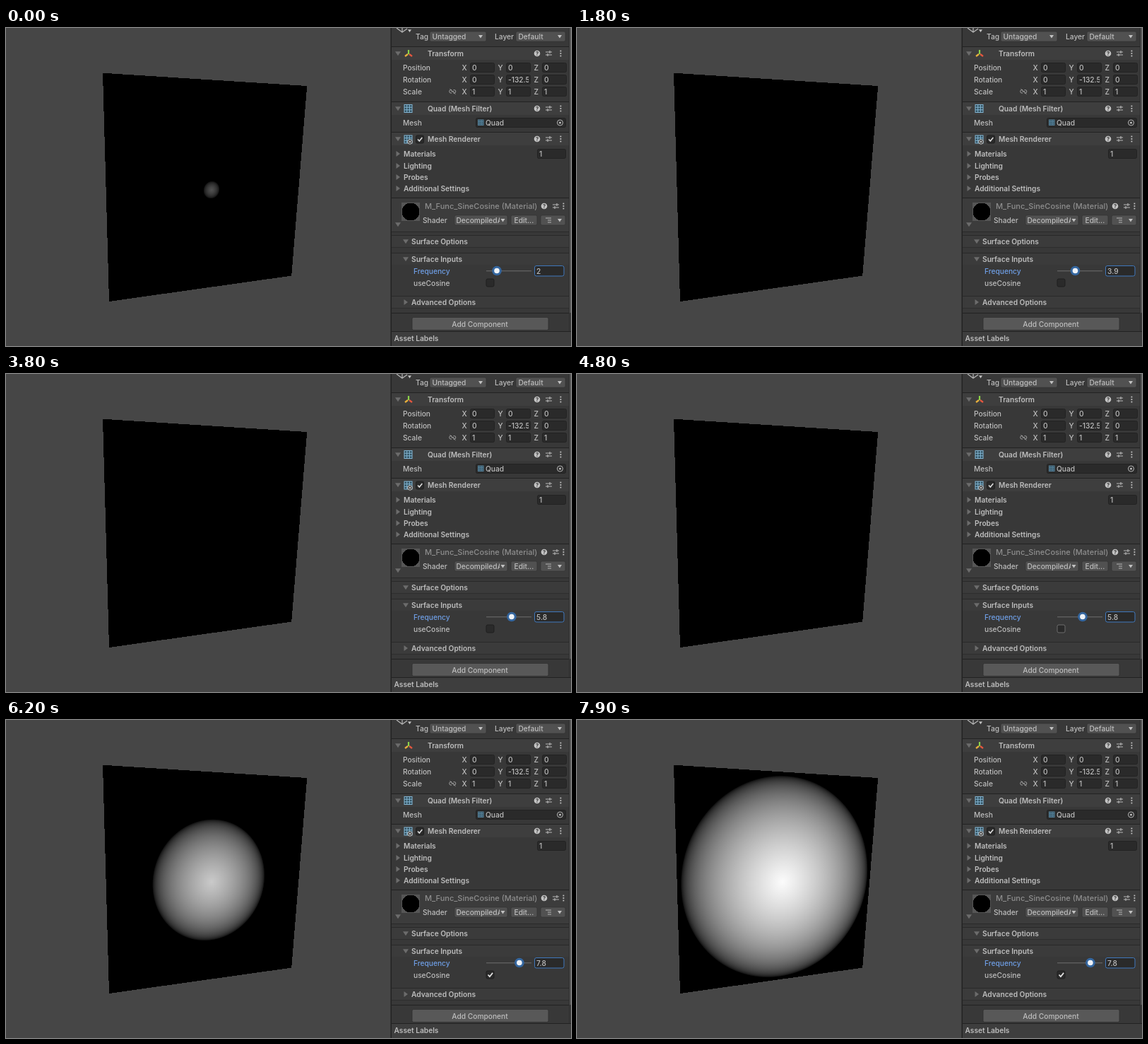
An HTML page with a canvas for the animation above (8000 ms loop, 800 by 450 pixels).

```html
<!DOCTYPE html>
<html lang="en">
<head>
<meta charset="utf-8">
<title>Sine and cosine shader</title>
<style>
html, body { margin: 0; width: 100%; height: 100%; overflow: hidden; background: #464646; }
canvas, svg { position: absolute; left: 0; top: 0; }
text { font: 500 10.2px Inter, Roboto, sans-serif; fill: #bebebe; white-space: pre; }
.b { font-weight: 600; }
.big { font-size: 11px; fill: #8e8e8e; }
</style>
</head>
<body>
<canvas id="stage" width="800" height="450"></canvas>
<svg id="panel" width="800" height="450"></svg>
<canvas id="preview" width="26" height="26" style="left:560px;top:247px"></canvas>
<script>
const LOOP = 8000, STEP = 100;
const START = 28.317; // shader clock, in seconds, when the loop begins
const CHECKED = 4900, REFOCUS = 5400;
const FREQUENCY = [[0, 2], [1600, 2.4], [1700, 3.1], [1800, 3.9], [1900, 4.8], [2000, 5.5], [2100, 5.8],
  [5500, 6.2], [5600, 6.8], [5700, 7.4], [5800, 7.8]];

// ---- inspector panel ----
const out = [];
const rect = (x, y, w, h, fill, extra = '') =>
  out.push(`<rect x="${x}" y="${y}" width="${w}" height="${h}" fill="${fill}" ${extra}/>`);
const path = (d, stroke, width = 1, fill = 'none') =>
  out.push(`<path d="${d}" stroke="${stroke}" stroke-width="${width}" fill="${fill}"/>`);
const text = (x, cy, s, cls = '', extra = '') =>
  out.push(`<text x="${x}" y="${cy + 3.7}" class="${cls}" ${extra}>${s}</text>`);
const line = (y, fill = '#222') => rect(546, y, 251, 1, fill);
const band = (y, h, fill = '#3e3e3e', edge) => { line(y - 1, edge); rect(546, y, 251, h, fill); };
const section = (y, h) => band(y, h, '#3b3b3b', '#292929');
const down = (x, y, fill = '#6c6c6c', r = 4) =>
  path(`M${x - r} ${y - r * .7}h${2 * r}l${-r} ${r * 1.5}z`, 'none', 0, fill);
const right = (x, y) => path(`M${x - 2.5} ${y - 4}v8l5.5 -4z`, 'none', 0, '#6c6c6c');
const field = (x, y, w, s) => {
  rect(x + .5, y - 6.5, w - 1, 13, '#2a2a2a', 'rx="2" stroke="#222"');
  if (s) text(x + 3, y, s);
};
const button = (x, y, w, h, s, sx, arrow) => {
  rect(x, y - h / 2, w, h, '#515151', 'rx="2" stroke="#303030" stroke-width=".6"');
  text(sx, y, s);
  if (arrow) down(x + w - 8, y, '#c2c2c2', 3);
};
const tools = (y, x = 752, dots = 785.4) => {
  out.push(`<circle cx="${x}" cy="${y}" r="4.3" fill="#c4c4c4"/>`);
  out.push(`<text x="${x}" y="${y + 2.7}" text-anchor="middle" style="font-size:7.5px;font-weight:700;fill:#333">?</text>`);
  path(`M${x + 12} ${y - 2}h9M${x + 12} ${y + 2}h9M${x + 18} ${y - 4}v4M${x + 15} ${y}v4`, '#b8b8b8', 1.1);
  for (const d of [-3.5, 0, 3.5]) rect(dots - .9, y + d - .9, 1.8, 1.8, '#c4c4c4');
};
const grid = (x, y, size, stroke = '#84b6d4') => {
  rect(x, y, size, size, '#31505f', `stroke="${stroke}"`);
  const q = size / 3;
  for (const k of [1, 2])
    path(`M${x + k * q} ${y}v${size}M${x} ${y + k * q}h${size}`, stroke, 1);
};

rect(545, 0, 255, 450, '#383838');
rect(544.5, 0, 1.5, 450, '#222');
rect(797, 0, 1, 430, '#2e2e2e');
rect(798, 0, 2, 403, '#565656');

path('M553 0l8 6l7 -5M561 6v-6', '#b8b8b8', 1.2);
down(571.5, 4, '#c4c4c4', 2.5);
text(580, 12, 'Tag');
button(600, 12, 80, 14, 'Untagged', 603.5, true);
text(692, 12, 'Layer');
button(722, 12, 70, 14, 'Default', 725.5, true);

band(27, 18);
down(555, 36);
path('M570 37V31', '#8bd34a', 2.2);
path('M569 37l-4 3', '#e8b03c', 2.2);
path('M571 37l4 3', '#e5573f', 2.2);
text(597, 36, 'Transform', 'b');
tools(36);
[['Position', '0', '0', '0'], ['Rotation', '0', '-132.5', '0'], ['Scale', '1', '1', '1']].forEach(([name, ...v], i) => {
  const y = 56 + 17 * i;
  text(562, y, name);
  ['X', 'Y', 'Z'].forEach((axis, k) => {
    const x = 657 + 51 * k;
    text(x - 11.5, y, axis);
    field(x, y, 35, '');
    out.push(`<svg x="${x}" y="${y - 7}" width="32" height="14"><text x="3" y="10.7">${v[k]}</text></svg>`);
  });
});
path('M631 87.5h-1a2.3 2.3 0 0 0 0 4.6h1M633.5 87.5h1a2.3 2.3 0 0 1 0 4.6h-1M630.5 89.8h4M628.5 86.3l8 7.4', '#aaa', .9);

band(105, 18);
down(555, 114);
grid(564, 108.5, 11);
text(597, 114, 'Quad (Mesh Filter)', 'b');
tools(114);
text(562, 134, 'Mesh');
field(665, 134, 128, '');
grid(668.5, 130, 7.5, '#557f97');
text(679, 134, 'Quad');
out.push('<circle cx="784.5" cy="134" r="4" fill="none" stroke="#b8b8b8"/><circle cx="784.5" cy="134" r="1.5" fill="#c2c2c2"/>');

band(148, 18);
down(555, 157);
grid(564, 152, 11);
out.push('<circle cx="572" cy="161" r="3.2" fill="#383838" stroke="#ccc"/><circle cx="572" cy="161" r="1.3" fill="#ccc"/>');
rect(580.5, 152, 11, 11, '#2a2a2a', 'rx="2" stroke="#1f1f1f"');
path('M583 157.5l2.3 2.5l4 -5', '#ddd', 1.6);
text(597, 157, 'Mesh Renderer', 'b');
tools(157);
['Materials', 'Lighting', 'Probes', 'Additional Settings'].forEach((s, i) => {
  const y = [178, 195, 211, 227][i];
  right(555, y);
  text(563, y, s, 'b');
});
field(752, 178, 41, '1');

band(241, 47, '#3c3c3c');
rect(560, 247, 26, 26, '#565656');
down(555, 278);
text(593, 252, 'M_Func_SineCosine (Material)', 'big');
tools(252, 762, 789.4);
text(590, 272, 'Shader');
button(635, 272, 75, 14, 'DecompiledA', 637.5, false);
rect(699, 266, 10, 12, '#515151');
down(703.5, 272, '#c2c2c2', 3);
button(715, 272, 37, 14, 'Edit...', 719.5, false);
button(757, 272, 35, 14, '', 760, true);
path('M764 269h8M767 272h5M767 275h5', '#b8b8b8', 1.1);
line(288, '#292929');

section(294, 16);
down(566, 302);
text(574, 302, 'Surface Options', 'b');
line(310, '#2e2e2e');
section(319, 16);
down(566, 327);
text(574, 327, 'Surface Inputs', 'b');

text(577, 343.8, 'Frequency', '', 'id="freqLabel"');
rect(680, 343, 64, 1.4, '#5e5e5e');
out.push('<g id="thumb"><circle id="halo" cy="343.5" r="6.8" fill="#34669f"/><circle cy="343.5" r="3.8" fill="#eef2f7"/></g>');
rect(748.5, 336.5, 41.5, 14.5, '#2a2a2a', 'rx="2.5" id="freqBox"');
text(751, 343.8, '2', '', 'id="freqValue"');
text(577, 360.8, 'useCosine', '', 'id="cosLabel"');
rect(680, 355, 11, 11, '#2a2a2a', 'rx="2" id="checkBox"');
out.push('<path id="tick" d="M682.5 360.5l2.4 2.6l4.2 -5.2" fill="none" stroke="#e2e2e2" stroke-width="1.7"/>');

section(380, 16);
right(566, 388);
text(574, 388, 'Advanced Options', 'b');
line(396, '#2e2e2e');
line(403);
rect(575, 409.5, 193, 18, '#585858', 'rx="2" stroke="#303030" stroke-width=".8"');
text(671, 418.8, 'Add Component', '', 'text-anchor="middle"');
rect(545, 429, 255, 1, '#222');
rect(546, 430, 254, 20, '#3e3e3e');
text(549.5, 439.5, 'Asset Labels', 'b');
document.getElementById('panel').innerHTML = out.join('');

// ---- shader ----
const ids = {};
for (const el of document.querySelectorAll('[id]')) ids[el.id] = el;

const frequency = t => FREQUENCY.filter(k => k[0] <= t).pop()[1];
const wave = t => (t >= CHECKED ? Math.cos : Math.sin)(frequency(t) * (START + t / 1000));
const encode = v => 255 * (v <= 0 ? 0 : v < .0031308 ? 12.92 * v : 1.055 * Math.min(v, 1) ** (1 / 2.4) - .055);

// A field holds, per pixel, the scaled distance from the UV centre, or -1 outside the shape.
function makeField(canvas, x0, y0, w, h, distance) {
  const ctx = canvas.getContext('2d');
  const image = ctx.createImageData(w, h);
  const dist = new Float32Array(w * h);
  for (let i = 0; i < dist.length; i++) {
    dist[i] = distance(x0 + i % w + .5, y0 + Math.floor(i / w) + .5);
    image.data[4 * i + 3] = dist[i] < 0 ? 0 : 255;
  }
  return (level, gain = 1) => {
    dist.forEach((d, i) => {
      if (d >= 0) image.data.fill(encode((level - d) * gain), 4 * i, 4 * i + 3);
    });
    ctx.putImageData(image, x0, y0);
  };
}

// Inverse of the projection taking the unit square to the quad a, b, c, d.
function unproject([ax, ay], [bx, by], [cx, cy], [dx, dy]) {
  const sx = ax - bx + cx - dx, sy = ay - by + cy - dy;
  const den = (bx - cx) * (dy - cy) - (dx - cx) * (by - cy);
  const g = (sx * (dy - cy) - (dx - cx) * sy) / den;
  const h = ((bx - cx) * sy - sx * (by - cy)) / den;
  const ux = bx - ax + g * bx, uy = by - ay + g * by;
  const vx = dx - ax + h * dx, vy = dy - ay + h * dy;
  return (x, y) => {
    const p = ux - g * x, q = vx - h * x, r = x - ax;
    const s = uy - g * y, t = vy - h * y, w = y - ay;
    const det = p * t - q * s;
    return [(r * t - q * w) / det, (p * w - r * s) / det];
  };
}

const toUV = unproject([137, 63.7], [426.2, 82], [404.2, 350.6], [146, 387]);
const paintQuad = makeField(ids.stage, 130, 60, 300, 330, (x, y) => {
  const [u, v] = toUV(x, y);
  return u < 0 || u > 1 || v < 0 || v > 1 ? -1 : 2 * Math.hypot(u - .5, v - .5);
});

const TILT = .35;
const paintPreview = makeField(ids.preview, 0, 0, 26, 26, (px, py) => {
  const x = (px - 13) / 12.5, y = (13 - py) / 12.5, rr = x * x + y * y;
  if (rr > 1) return -1;
  const z = Math.sqrt(1 - rr);
  const up = y * Math.cos(TILT) + z * Math.sin(TILT);
  const front = z * Math.cos(TILT) - y * Math.sin(TILT);
  const u = .5 - Math.abs(Math.atan2(x, front)) / (2 * Math.PI);
  return 2 * Math.hypot(u, Math.asin(Math.max(-1, Math.min(1, up))) / Math.PI);
});

function previewLevel(t) {
  if (t < 1500) return wave(t);
  return t < 2500 ? 0 : wave(t - 600); // the preview refreshes late
}

function draw(t) {
  const f = frequency(t);
  const onCheck = t >= CHECKED && t < REFOCUS;
  const hover = t >= 4600 && t < 5200;
  paintQuad(wave(t));
  paintPreview(previewLevel(t), 1.6);
  ids.thumb.setAttribute('transform', `translate(${684 + 5.5 * f} 0)`);
  ids.halo.style.opacity = onCheck ? 0 : 1;
  ids.freqValue.textContent = f;
  ids.freqLabel.style.fill = onCheck ? '#bebebe' : '#6f9fe6';
  ids.cosLabel.style.fill = onCheck ? '#6f9fe6' : '#bebebe';
  ids.freqBox.setAttribute('stroke', onCheck ? '#222' : '#4079bd');
  ids.checkBox.setAttribute('stroke', onCheck ? '#4079bd' : hover ? '#6c6c6c' : '#1f1f1f');
  ids.tick.style.opacity = t >= CHECKED ? 1 : 0;
}

const begin = performance.now();
let shown = -1;
function tick() {
  const t = Math.floor((performance.now() - begin) % LOOP / STEP) * STEP;
  if (t !== shown) draw(shown = t);
  requestAnimationFrame(tick);
}
tick();
</script>
</body>
</html>
```
